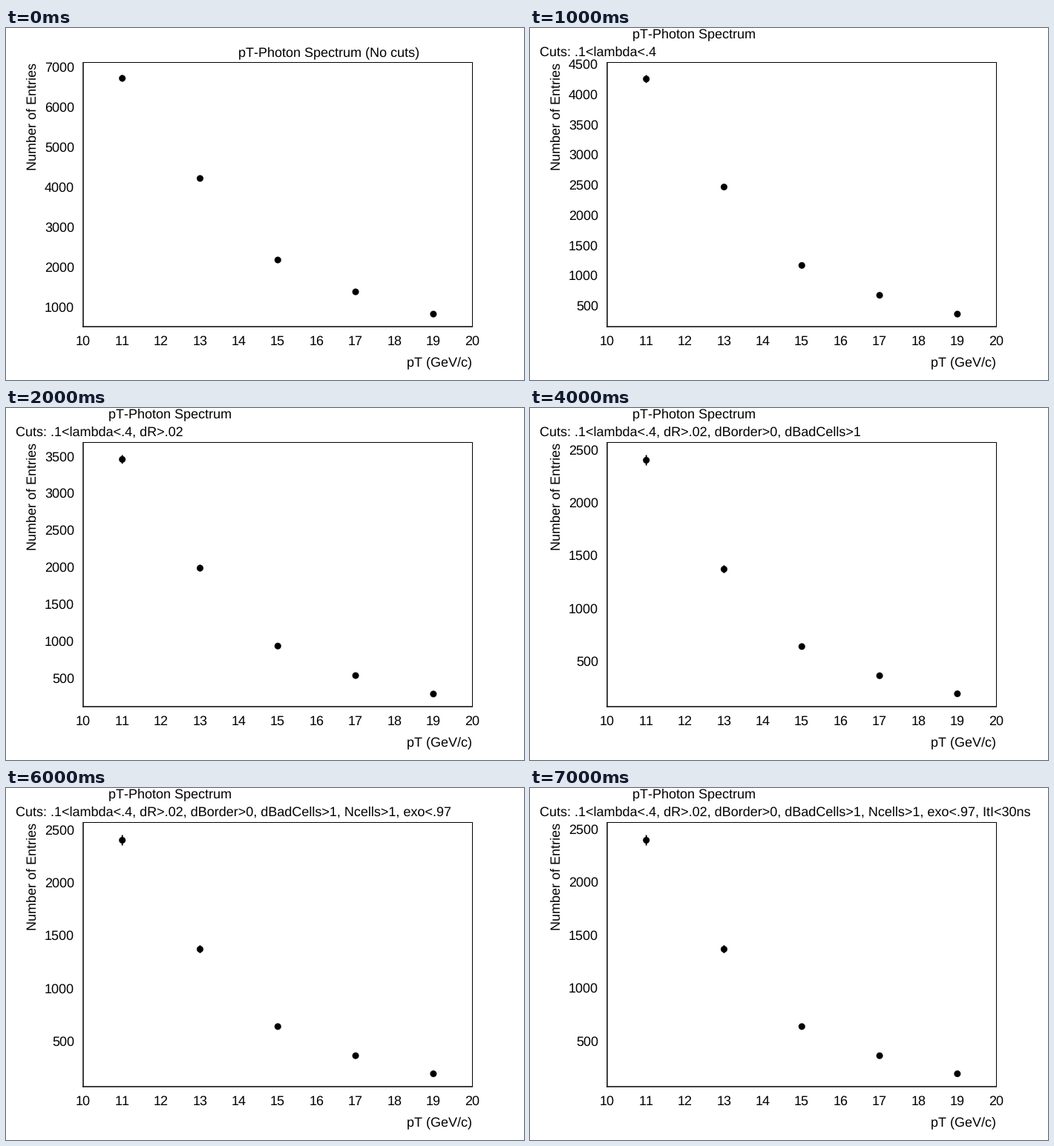
These frames come from a looping animation (698x475 px, 8 s). A matplotlib script:

```python
import matplotlib.pyplot as plt
import numpy as np
from matplotlib.animation import FuncAnimation
from matplotlib.patches import Circle

W, H, DPI = 698, 475, 64
PT = 72 / DPI  # points per pixel
LEFT, RIGHT, TOP, BOTTOM = 104, 628.5, 46.5, 403
UNIT = 52.4  # pixels per GeV/c

plt.rcParams.update({
    "font.family": "Liberation Sans",
    "font.size": 18 * PT,
    "text.hinting": "none",
    "text.kerning_factor": 6,
})

BINS = np.arange(5)
DOT_X = LEFT + UNIT * (2 * BINS + 1) + 0.3
RAW = np.array([6720, 4213, 2171, 1373, 816])

# each cut: name, fraction kept in the first bin, loss of that per bin
CUTS = [
    (".1<lambda<.4", 0.633, 0.048),
    ("dR>.02", 0.813, 0.007),
    ("dBorder>0", 0.932, 0.004),
    ("dBadCells>1", 0.745, 0.002),
    ("Ncells>1", 1, 0),
    ("exo<.97", 1, 0),
    ("ItI<30ns", 0.997, 0),
]

fig = plt.figure(figsize=(W / DPI, H / DPI), dpi=DPI, facecolor="white")
ax = fig.add_axes([0, 0, 1, 1])
ax.set_xlim(0, W)
ax.set_ylim(H, 0)
ax.axis("off")


def text(x, y, s, **kw):
    return ax.text(x, y, s, color="black", ha="left", va="baseline", **kw)


def line(x0, y0, x1, y1, width):
    return ax.plot([x0, x1], [y0, y1], color="black", lw=width * PT,
                   solid_capstyle="butt", snap=False)[0]


def draw_axes():
    line(LEFT, TOP, RIGHT, TOP, 1)
    line(RIGHT, TOP - 0.5, RIGHT, BOTTOM, 1)
    line(LEFT, TOP - 0.5, LEFT, BOTTOM + 0.7, 1.5)
    line(LEFT - 0.7, BOTTOM, RIGHT + 0.5, BOTTOM, 1.5)
    for i in range(11):
        text(LEFT - 10 + UNIT * i, 428, str(10 + i))
    text(540, 456, "pT (GeV/c)")
    text(41, 192, "Number of Entries", rotation=90, rotation_mode="anchor")


def draw_titles(n):
    if n == 0:
        return [text(313, 38, "pT-Photon Spectrum (No cuts)")]
    names = ", ".join(name for name, _, _ in CUTS[:n])
    return [text(138, 13, "pT-Photon Spectrum"),
            text(12.6, 38, "Cuts: " + names)]


def draw_data(n):
    counts = RAW.astype(float)
    for _, keep, loss in CUTS[:n]:
        counts = counts * (keep - loss * BINS)
    errors = np.sqrt(counts)

    # the vertical axis spans the error bars with a 5% margin
    low, high = (counts - errors).min(), (counts + errors).max()
    margin = 0.05 * (high - low)
    low, high = low - margin, high + margin
    scale = (BOTTOM - TOP) / (high - low)

    def to_y(value):
        return BOTTOM + 0.8 - (value - low) * scale

    parts = []
    step = 1000 if high > 5000 else 500
    for value in range(step, int(high) + 1, step):
        label = str(value)
        parts.append(text(92 - 10 * len(label), round(to_y(value) + 6.4), label))
    for x, count, err in zip(DOT_X, counts, errors):
        parts.append(line(x, to_y(count - err), x, to_y(count + err), 1.8))
        parts.append(ax.add_patch(Circle((x, to_y(count)), 4.5, fc="black", lw=0)))
    return parts


shown = []


def update(n):
    while shown:
        shown.pop().remove()
    shown.extend(draw_titles(n) + draw_data(n))
    return shown


draw_axes()
anim = FuncAnimation(fig, update, frames=len(CUTS) + 1, interval=1000,
                     init_func=lambda: update(0), repeat=True,
                     repeat_delay=0, blit=False)
plt.show()
```
